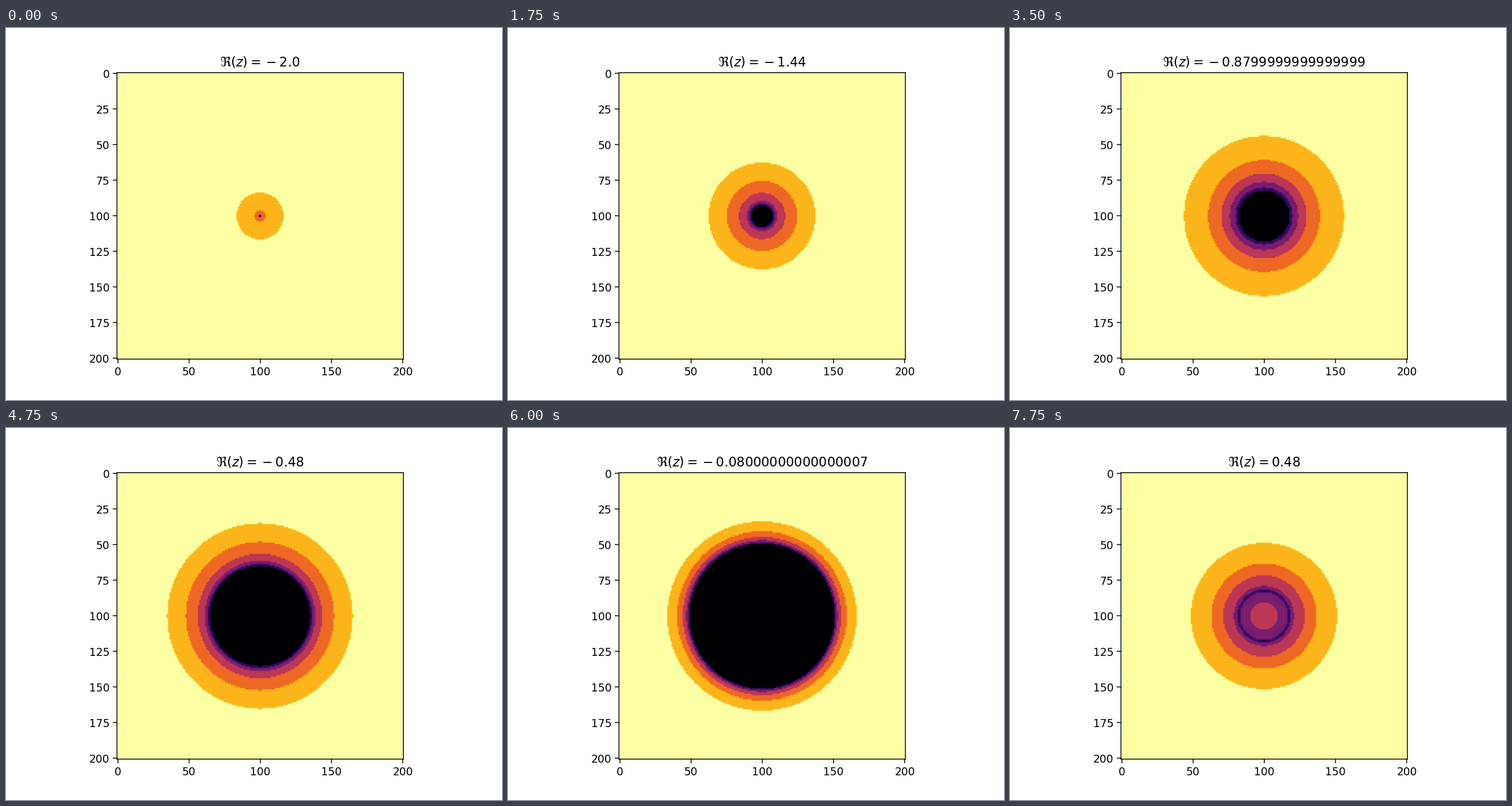
Recreate the animation shown at these times as a matplotlib script. Size 864 by 648 pixels, loop 8000 ms.

```python
import numpy as np
import matplotlib.pyplot as plt
from matplotlib.animation import FuncAnimation

FRAMES, INTERVAL = 32, 250
AXIS = np.linspace(-2, 2, 201)
REALS = np.linspace(-2, 2, 51)
RADIUS = np.hypot(*np.meshgrid(AXIS, AXIS))  # length of the imaginary part
BAILOUT = np.sqrt(12)  # largest |c| on the grid
FIRST, LAST = 3, 8  # iterations that separate the colour bands


def escape_slice(real):
    """Slice of the quaternion Mandelbrot set: 0 is inside, 6 escapes first."""
    c = real + 1j * RADIUS
    z = c
    level = np.zeros(RADIUS.shape)
    for step in range(2, LAST + 1):
        z = z * z + c
        if step >= FIRST:
            level += np.abs(z) > BAILOUT
    return level


def title_text(real):
    # The empty group keeps the wide spacing around the minus sign.
    return rf"$\Re(z) = {{}}{float(real)}$"


fig, ax = plt.subplots(figsize=(6.4, 4.8), dpi=135)
image = ax.imshow(escape_slice(REALS[0]), cmap="inferno",
                  vmin=0, vmax=LAST - FIRST + 1)
title = ax.set_title(title_text(REALS[0]))
ax.spines[:].set_snap(False)  # keep the border at its exact position


def update(i):
    image.set_data(escape_slice(REALS[i]))
    title.set_text(title_text(REALS[i]))
    return image, title


anim = FuncAnimation(fig, update, frames=FRAMES, interval=INTERVAL,
                     repeat=True, repeat_delay=0)
plt.show()
```
